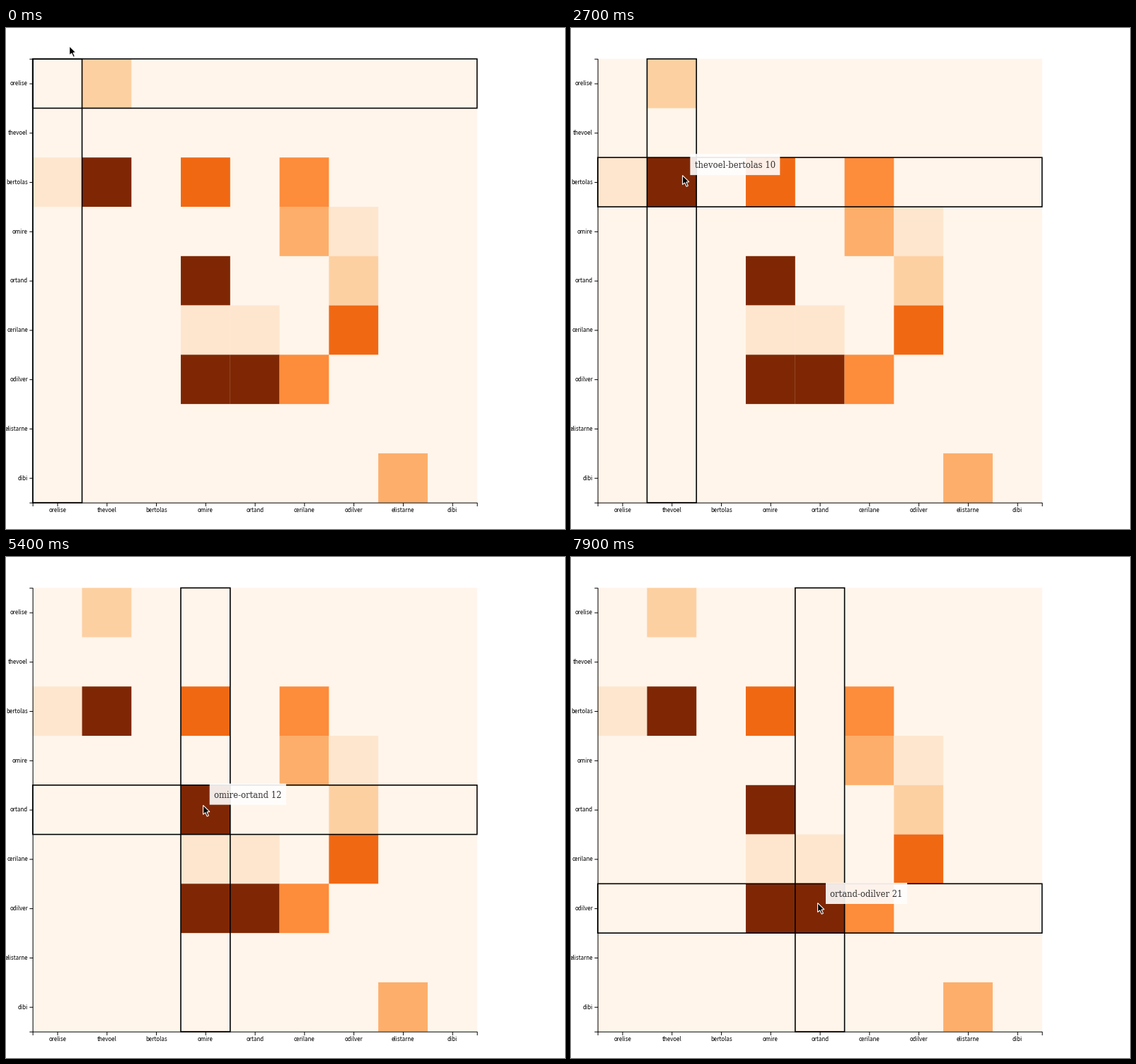
Recreate the animation shown at these times as a matplotlib script. Size 790 by 709 pixels, loop 8000 ms.

```python
import matplotlib.pyplot as plt
import numpy as np
from matplotlib.animation import FuncAnimation
from matplotlib.patches import Polygon, Rectangle

WIDTH, HEIGHT, DPI = 790, 709, 100
STEP_MS, LOOP_MS, MOVE_MS = 100, 8000, 250
PX = 72 / DPI  # points per pixel

NAMES = ["orelise", "thevoel", "bertolas", "omire", "ortand",
         "cerilane", "odilver", "elistarne", "dibi"]
LEFT, TOP, SIDE = 37.7, 43.7, 628
CELL = SIDE / len(NAMES)
RIGHT, BOTTOM = LEFT + SIDE, TOP + SIDE

# (row, column): value
VALUES = {(0, 1): 2, (2, 0): 1, (2, 1): 10, (2, 3): 5, (2, 5): 4,
          (3, 5): 3, (3, 6): 1, (4, 3): 12, (4, 6): 2, (5, 3): 1,
          (5, 4): 1, (5, 6): 5, (6, 3): 15, (6, 4): 21, (6, 5): 4,
          (8, 7): 3}
TOP_SHADE = 8  # values from here up share the darkest colour

# Pointer key points: time, x, y
KEYS = np.array([
    (750, 89, 25), (1300, 104, 78), (1595, 104, 78), (1700, 115, 77),
    (2150, 142, 112), (2300, 145, 171), (2700, 157, 208), (3395, 157, 208),
    (3600, 209, 251), (3940, 247, 300), (4300, 274, 347), (5365, 274, 347),
    (6000, 346, 415), (6540, 330, 435), (6780, 310, 489), (7580, 310, 489),
    (7780, 348, 489)])
ARROW = np.array([(0.6, 0.6), (0.6, 13.6), (3.7, 10.9), (6.2, 16.3),
                  (8.4, 15.3), (6, 10.1), (9.9, 9.8)])
TIP_LAG_MS, TIP_OFFSET = 20, np.array([12, -28])
TIP_PAD, TIP_HEIGHT, TIP_BASELINE = 6.4, 30, 20

fig = plt.figure(figsize=(WIDTH / DPI, HEIGHT / DPI), dpi=DPI, facecolor="white")
ax = fig.add_axes([0, 0, 1, 1])
ax.set_xlim(0, WIDTH)
ax.set_ylim(HEIGHT, 0)
ax.axis("off")


def rect(x, y, w, h, **style):
    return ax.add_patch(Rectangle((x, y), w, h, snap=False, **style))


def line(xs, ys):
    ax.plot(xs, ys, color="black", lw=PX, snap=False, solid_capstyle="butt",
            solid_joinstyle="miter", zorder=2)


def axis_label(x, y, name, align):
    ax.text(x, y, name, ha=align, va="baseline", color="black",
            family="Noto Sans CJK JP", size=8 * PX)


def shade(value):
    return plt.cm.Oranges(min(value, TOP_SHADE) / TOP_SHADE)


def draw_chart():
    rect(LEFT, TOP, SIDE, SIDE, fc=shade(0), lw=0)
    for (row, col), value in VALUES.items():
        rect(LEFT + col * CELL, TOP + row * CELL, CELL, CELL, fc=shade(value), lw=0)

    shift, tick = 0.4, 4.8
    x0, y0 = LEFT + shift, BOTTOM + shift
    line([x0 - tick, x0, x0, x0 - tick], [TOP + shift, TOP + shift, y0, y0])
    line([x0, x0, RIGHT + shift, RIGHT + shift], [y0 + tick, y0, y0, y0 + tick])
    for i, name in enumerate(NAMES):
        middle = (i + 0.5) * CELL
        x, y = LEFT + middle, TOP + middle
        line([x0 - tick, x0], [y + shift, y + shift])
        line([x + shift, x + shift], [y0, y0 + tick])
        axis_label(LEFT - 6.8, y + 2.8, name, "right")
        axis_label(x, BOTTOM + 13.1, name, "center")


def pointer_at(t):
    return np.array([np.interp(t, KEYS[:, 0], KEYS[:, k]) for k in (1, 2)])


def hovered_cell(t):
    x, y = pointer_at(t)
    return max(int((x - LEFT) // CELL), 0), max(int((y - TOP) // CELL), 0)


def crossings(axis):
    """List (time, new index) wherever the pointer enters another column or row."""
    moves, index = [], 0
    for t in range(0, LOOP_MS, 2):
        entered = hovered_cell(t)[axis]
        if entered != index:
            moves.append((t, entered))
            index = entered
    return moves


def cubic_in_out(p):
    p = min(max(p, 0), 1)
    return 4 * p ** 3 if p < 0.5 else 1 - 4 * (1 - p) ** 3


def highlight_position(moves, t):
    position = 0
    for start, index in moves:
        position += (index - position) * cubic_in_out((t - start) / MOVE_MS)
    return position


draw_chart()
column_moves, row_moves = crossings(0), crossings(1)

outline = dict(fill=False, ec="black", lw=1.6 * PX, joinstyle="miter", zorder=3)
row_box = rect(LEFT, TOP, SIDE, CELL, **outline)
col_box = rect(LEFT, TOP, CELL, SIDE, **outline)
tip_box = rect(0, 0, 1, TIP_HEIGHT, fc="white", lw=0, alpha=0.9, zorder=4)
tip_text = ax.text(0, 0, "", family="DejaVu Serif", size=11.6 * PX,
                   color="black", alpha=0.8, va="baseline", zorder=5)
pointer = ax.add_patch(Polygon(ARROW, fc="black", ec="white", lw=1.1 * PX, zorder=6))


def update(frame):
    t = frame * STEP_MS
    col_box.set_x(LEFT + CELL * highlight_position(column_moves, t))
    row_box.set_y(TOP + CELL * highlight_position(row_moves, t))
    pointer.set_xy(ARROW + pointer_at(t))

    followed = pointer_at(t - TIP_LAG_MS)
    visible = followed[1] > TOP
    tip_box.set_visible(visible)
    tip_text.set_visible(visible)
    if visible:
        col, row = hovered_cell(t - TIP_LAG_MS)
        x, y = followed + TIP_OFFSET
        tip_text.set_text(f"{NAMES[col]}-{NAMES[row]} {VALUES.get((row, col), 0)}")
        tip_text.set_position((x + TIP_PAD, y + TIP_BASELINE))
        tip_box.set_xy((x, y))
        tip_box.set_width(tip_text.get_window_extent().width + 2 * TIP_PAD)
    return row_box, col_box, tip_box, tip_text, pointer


animation = FuncAnimation(fig, update, frames=LOOP_MS // STEP_MS,
                          interval=STEP_MS, repeat=True, repeat_delay=0)
plt.show()
```
